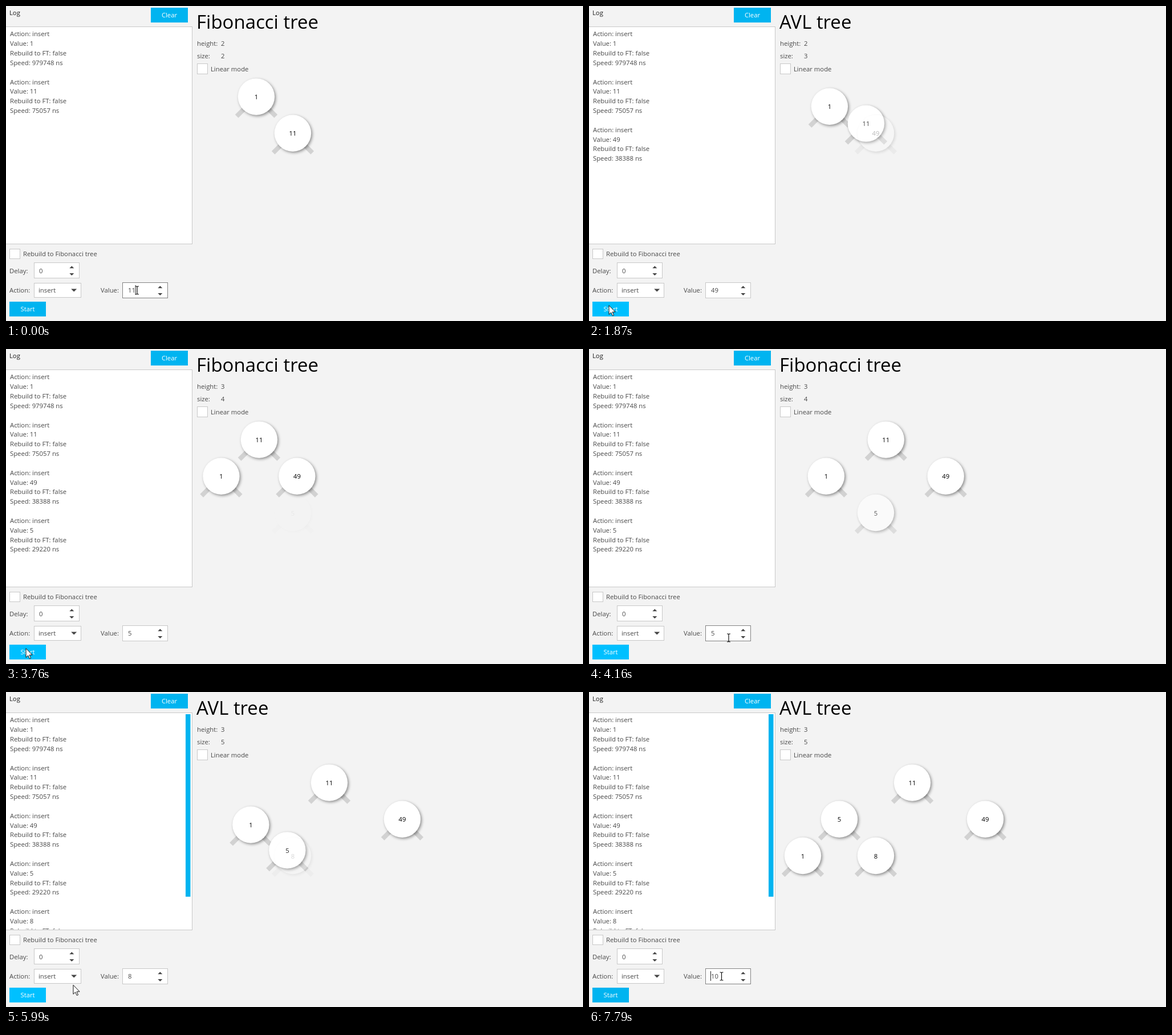
Recreate the animation shown at these times as an HTML page. Size 1012 px wide and 554 px high, loop 8000 ms.

```html
<!DOCTYPE html>
<html lang="en">
<head>
<meta charset="utf-8">
<title>Search tree</title>
<style>
  html, body { margin: 0; width: 100%; height: 100%; overflow: hidden; background: #f3f3f3; }
  svg { display: block; width: 1012px; height: 554px; }
  text { font: 11.3px "Open Sans", "Noto Sans", sans-serif; fill: #484848; white-space: pre; }
  .title { font-size: 33px; fill: #000; }
  .dark { fill: #222; }
  .mid { text-anchor: middle; }
  .light { fill: #fff; }
  .box { fill: #fff; stroke: #c8c8c8; }
  .box.focused { stroke: #828282; }
  .accent { fill: #00b4f0; }
  .accent.hover { fill: #00c0ff; }
  .node text { fill: #000; }
  .node path { stroke: #d2d2d2; stroke-width: 8; fill: none; }
  .node circle { fill: #fff; filter: drop-shadow(2px 2px 2.5px rgba(0, 0, 0, .42)); }
</style>
</head>
<body>
<svg id="stage" viewBox="0 0 1012 554"></svg>
<script>
const LOOP = 8000, MOVE = 800;
const stage = document.getElementById('stage');

function add(tag, attrs, parent = stage) {
  const el = document.createElementNS('http://www.w3.org/2000/svg', tag);
  for (const k in attrs) el.setAttribute(k, attrs[k]);
  parent.append(el);
  return el;
}
function label(x, y, str, cls = '', parent = stage) {
  const el = add('text', { x, y, class: cls }, parent);
  el.textContent = str;
  return el;
}
const rect = (x, y, width, height, cls) => add('rect', { x, y, width, height, class: cls });
const triangle = (x, y, w, h) =>
  add('path', { d: `M${x - w} ${y}H${x + w}L${x} ${y + h}Z`, fill: '#444' });
function spinner(x, y) {
  const box = rect(x + .5, y + .5, 79, 27, 'box');
  triangle(x + 66.3, y + 10.3, 4, -4);
  triangle(x + 66.3, y + 19, 4, 4);
  return box;
}
function setText(el, str) {
  if (el.textContent !== str) el.textContent = str;
}
const show = (el, on) => el.setAttribute('visibility', on ? 'visible' : 'hidden');
const place = (el, x, y) => el.setAttribute('transform', `translate(${x} ${y})`);
const mix = (a, b, p) => a + (b - a) * p;
const ramp = (t, from, length) => Math.min(1, Math.max(0, (t - from) / length));

// Each round edits the value, then presses Start at `run` and rests there for `stay`
const rounds = [
  { keys: '<<49!', from: 240, to: 820, run: 1620, stay: 260, rest: [230, 500] },
  { keys: '<<5!', from: 2620, to: 2940, run: 3672, stay: 150, rest: [249.5, 509] },
  { keys: '<8!', from: 4680, to: 5190, run: 5815, stay: 50, rest: [245, 508] },
  { keys: '<11<0!', from: 6710, to: 7790, run: LOOP + 1000, rest: [232.5, 500] }
];
const inserted = [[1, 979748], [11, 75057], [49, 38388], [5, 29220], [8, 31420]];

// Left panel
label(6, 16, 'Log', 'dark');
rect(254, 3, 65, 26, 'accent');
label(286.5, 20, 'Clear', 'mid light');
rect(-.5, 36.5, 327, 382, 'box');
add('rect', { x: 0, y: 38, width: 326, height: 379.5 }, add('clipPath', { id: 'logClip' }));
const log = add('g', { 'clip-path': 'url(#logClip)' });
const entries = inserted.map(([value, ns], i) => {
  const g = add('g', {}, log);
  ['Action: insert', 'Value: ' + value, 'Rebuild to FT: false', `Speed: ${ns} ns`]
    .forEach((s, j) => label(7, 53.4 + 16.83 * (i * 5 + j), s, '', g));
  return g;
});
const scrollbar = rect(315, 39, 8.5, 321, 'accent');

rect(6.5, 427.5, 18, 17, 'box');
label(30, 440, 'Rebuild to Fibonacci tree');
label(6, 469.5, 'Delay:');
spinner(49, 451);
label(58, 469.5, '0');
label(6, 504, 'Action:');
rect(49.5, 487.5, 82, 25, 'box');
label(57, 504, 'insert');
triangle(119.2, 497.5, 5, 5);
label(166, 504, 'Value:');
const field = spinner(204, 486);
const valueText = label(214, 504, '');
const caret = rect(0, 491, 1, 17, 'dark');
const start = rect(6, 520, 64, 26, 'accent');
label(38, 537, 'Start', 'mid light');

// Right panel
const title = label(334, 40, '', 'title');
label(335, 70, 'height:');
label(335, 92, 'size:');
const heightText = label(377, 70, '');
const sizeText = label(377, 92, '');
rect(335.5, 101.5, 18, 18, 'box');
label(359, 114.5, 'Linear mode');

const nodes = inserted.map(([key]) => {
  const el = add('g', { class: 'node' });
  add('path', { d: 'M-34.3 34.3L0 0L34.3 34.3' }, el);
  add('circle', { r: 32.2 }, el);
  label(0, 4.5, String(key), 'mid', el);
  return { key, el };
});

// Pointers
const arrow = add('path', {
  d: 'M0 0V16L3.7 12.5L6.3 18.3L8.6 17.3L6.1 11.6H11.2Z', fill: '#fff', stroke: '#111'
});
const beam = add('path', {
  d: 'M-3 -7H-1L0 -6L1 -7H3M0 -6V6M-3 7H-1L0 6L1 7H3', fill: 'none', stroke: '#111', 'stroke-width': 1.2
});

// AVL tree
const height = n => n ? 1 + Math.max(height(n.left), height(n.right)) : 0;
const lean = n => height(n.right) - height(n.left);

function rotate(n, up, down) {
  const top = n[up];
  n[up] = top[down];
  top[down] = n;
  return top;
}
function insert(n, key) {
  if (!n) return { key };
  const side = key < n.key ? 'left' : 'right';
  n[side] = insert(n[side], key);
  if (Math.abs(lean(n)) < 2) return n;
  const [up, down] = lean(n) > 0 ? ['right', 'left'] : ['left', 'right'];
  if (lean(n) * lean(n[up]) < 0) n[up] = rotate(n[up], down, up);
  return rotate(n, up, down);
}
// Every row halves the distance between parent and child
function layout(n, x, y, step, cells = {}) {
  if (!n) return cells;
  cells[n.key] = [x, y];
  layout(n.left, x - step, y + 64.2, step / 2, cells);
  return layout(n.right, x + step, y + 64.2, step / 2, cells);
}
let root = null;
const states = inserted.map(([key], i) => {
  root = insert(root, key);
  const h = height(root), step = 64 * 2 ** (h - 2);
  const fewest = [0, 1, 2, 4, 7][h];
  return { h, size: i + 1, fibonacci: i + 1 === fewest, cells: layout(root, 311 + 2 * step, 159.6, step) };
});

// Constant speed with short acceleration and braking
function easeBoth(p) {
  if (p < .2) return 3.125 * p * p;
  if (p > .8) return 1 - 3.125 * (1 - p) ** 2;
  return 1.25 * p - .125;
}

function drawTree(n, t) {
  const { h, size, fibonacci, cells } = states[n + 1];
  const p = n ? easeBoth(ramp(t, rounds[n - 1].run, MOVE)) : 1;
  const before = n ? states[n].cells : cells;
  for (const { key, el } of nodes) {
    const to = cells[key], from = before[key];
    show(el, to);
    if (!to) continue;
    place(el, ...to.map((v, i) => from ? mix(from[i], v, p) : v));
    el.setAttribute('opacity', from ? 1 : p);
  }
  setText(title, fibonacci ? 'Fibonacci tree' : 'AVL tree');
  setText(heightText, String(h));
  setText(sizeText, String(size));
  entries.forEach((g, i) => show(g, i < size));
  show(scrollbar, size > 4);
}

// "<" erases, "!" commits and sends the caret home
function press(text, keys) {
  let pos = text.length;
  for (const k of keys) {
    if (k === '!') pos = 0;
    else {
      text = k === '<' ? text.slice(0, -1) : text + k;
      pos = text.length;
    }
  }
  return { text, pos };
}

function drawField(n, t) {
  const { keys, from, to, run } = rounds[n];
  const since = n ? t - rounds[n - 1].run : LOOP;
  const old = rounds.slice(0, n).reduce((text, r) => press(text, r.keys).text, '11');
  const count = Math.floor(ramp(t, from, to - from) * (keys.length - 1) + 1e-6) + 1;
  const { text, pos } = press(old, t < from ? '' : keys.slice(0, count));
  const focused = since > 460 && t < run - 60;
  setText(valueText, text);
  show(caret, focused && since > 600);
  caret.setAttribute('x', 213 + 6.8 * pos);
  field.classList.toggle('focused', focused);
  start.classList.toggle('hover', n > 0 && since < 620 || t > run - 180);
}

function drawPointer(t) {
  const i = rounds.findIndex(r => t < r.run + 700);
  const { run, stay, rest } = rounds[i];
  const away = t < run ? ramp(t, run - 580, 400) : 1 - ramp(t, run + stay, 300);
  const [restX, restY] = t < run ? rest : rounds[i + 1].rest;
  const x = mix(restX, 35, away), y = mix(restY, 526.5, away);
  const overField = x > 204 && y < 514;
  show(beam, overField);
  show(arrow, !overField);
  place(overField ? beam : arrow, x, y);
}

function draw(t) {
  const n = rounds.filter(r => r.run <= t).length;
  drawTree(n, t);
  drawField(n, t);
  drawPointer(t);
}

const begin = performance.now();
function tick() {
  draw((performance.now() - begin) % LOOP);
  requestAnimationFrame(tick);
}
tick();
</script>
</body>
</html>
```
